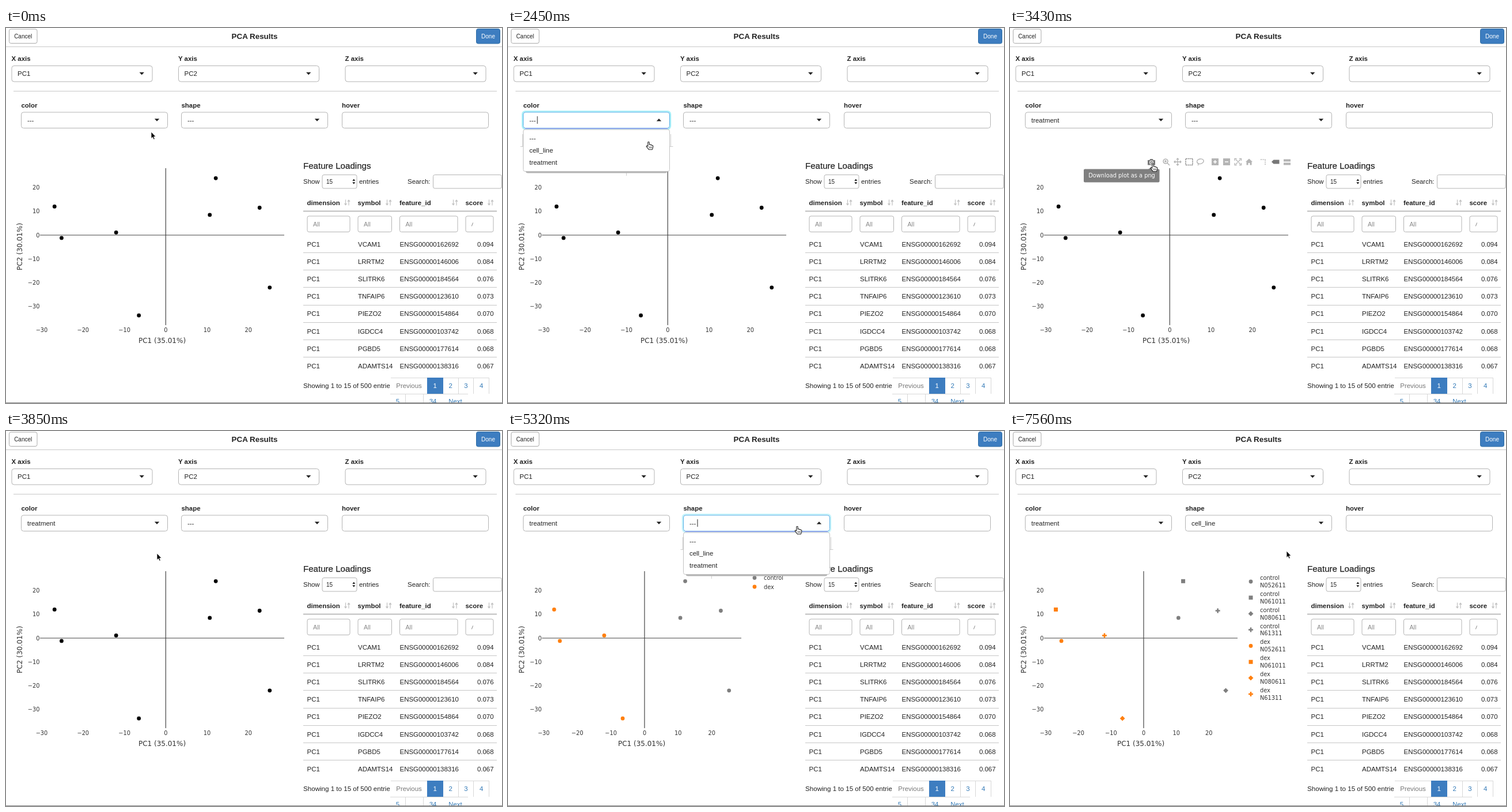
Animation, 861 px wide and 650 px high, one loop 8 s. Source, as an HTML page:

```html
<!DOCTYPE html>
<html lang="en">
<head>
<meta charset="utf-8">
<title>PCA Results</title>
<style>
html, body { margin: 0; height: 100%; overflow: hidden; background: #fff }
svg { display: block; width: 100vw; height: 100vh }
text { font: 11.45px "Liberation Sans", Arial, sans-serif; fill: #222 }
.bold { font-weight: bold }
.mid { text-anchor: middle }
.end { text-anchor: end }
.btn { font-size: 10px }
.head { font-size: 13.4px }
.section { font-size: 15.1px; stroke: #222; stroke-width: .25 }
.info { font-size: 11.6px }
.plot { font: 9.8px "DejaVu Sans", Verdana, sans-serif; fill: #333 }
.title { font-size: 12px }
.blue { fill: #337ab7 }
.gray { fill: #777 }
.white { fill: #fff }
.hint { fill: #888; font-size: 10.6px }
</style>
</head>
<body>
<svg viewBox="0 0 861 650"><g id="page"></g><g id="live"></g></svg>
<script>
const LOOP = 8000, STEP = 70;
const COLOR_OPEN = 1190, COLOR_CLOSE = 2870, COLOR_PLOT = 4130;
const SHAPE_OPEN = 5250, SHAPE_CLOSE = 6930, SHAPE_PLOT = 7490;
const COLOR_X = 26.5, SHAPE_X = 304.5;
const GRAY = '#7f7f7f', ORANGE = '#ff7f0e', BORDER = '#b4b4b4', BLUE = '#3d7dc0';
const options = ['---', 'cell_line', 'treatment'];
const lines = ['N052611', 'N061011', 'N080611', 'N61311'];

// PC1, PC2, cell line index; the first four samples are treated
const samples = [
  [-25.2, -1.2, 0], [-26.9, 12, 1], [-6.5, -33.7, 2], [-12, 1.1, 3],
  [10.65, 8.5, 0], [12.1, 23.9, 1], [25.15, -22, 2], [22.7, 11.5, 3]
];
const path = [
  [0, 252, 180], [70, 252, 180], [840, 245, 164], [2030, 245, 164], [2450, 244, 197],
  [2800, 248, 232], [3430, 248, 235], [3500, 248, 235], [3640, 262, 212], [4130, 262, 212],
  [4550, 343, 184], [4900, 502, 165], [5600, 502, 165], [6300, 480, 202], [6860, 480, 208], [LOOP, 480, 208]
];

const clamp = v => Math.max(0, Math.min(1, v));
const text = (x, y, s, cls = '') => `<text x="${x}" y="${y}" class="${cls}">${s}</text>`;
const rect = (x, y, w, h, fill = '#fff', stroke = BORDER, r = 0) =>
  `<rect x="${x}" y="${y}" width="${w}" height="${h}" rx="${r}" fill="${fill}" stroke="${stroke}"/>`;
const line = (d, color, w = 1, dash = 'none') =>
  `<path d="${d}" fill="none" stroke="${color}" stroke-width="${w}" stroke-dasharray="${dash}"/>`;
const fill = (d, color) => `<path d="${d}" fill="${color}"/>`;
const caretDown = (x, y) => fill(`M${x - 4.2} ${y - 2.3}h8.4l-4.2 4.6z`, '#222');
const caretUp = (x, y) => fill(`M${x - 4.2} ${y + 2}h8.4l-4.2 -4.6z`, '#222');

function header() {
  let s = rect(5.5, 2, 48.5, 24.5, '#fff', '#aaa', 3) + text(29.7, 18, 'Cancel', 'btn mid')
    + text(431.5, 19, 'PCA Results', 'bold head mid')
    + rect(816.5, 1.5, 41, 25.5, BLUE, '#2e6da4', 3) + text(837, 18, 'Done', 'btn mid white')
    + line('M0 32.5H861', '#c8c8c8') + line('M13 109.5H852', '#c8c8c8');
  [['X', 10, 'PC1'], ['Y', 299.5, 'PC2'], ['Z', 589, '']].forEach(([axis, x, value]) => {
    s += text(x - .5, 57, axis + ' axis', 'bold') + rect(x, 65.5, 244, 27.5, '#fff', BORDER, 4)
      + text(x + 10, 83, value) + caretDown(x + 225.7, 79);
  });
  return s + text(583, 138, 'hover', 'bold') + rect(583.5, 146, 254, 27.5, '#fff', BORDER, 4);
}

function table() {
  let s = text(516, 244, 'Feature Loadings', 'section')
    + text(516, 269.5, 'Show') + rect(549, 254.5, 60, 23.5, '#fff', BORDER, 3) + text(556, 270, '15', 'btn')
    + fill('M601.3 265l2.5-3.6 2.5 3.6zm0 2.2h5l-2.5 3.6z', '#222')
    + text(613, 269.5, 'entries') + text(697, 269.5, 'Search:') + rect(741.5, 254.5, 119, 23.5, '#fff', BORDER, 3);

  [['dimension', 523, 587, 74], ['symbol', 611, 659, 58.5], ['feature_id', 683.5, 774, 100.5], ['score', 798, 836, 48]]
    .forEach(([name, x, icon, w], i) => {
      s += text(x - .5, 306.5, name, 'bold')
        + line(`M${icon + 2.5} 297.5v9m-2-2.4l2 2.6 2-2.6M${icon + 8} 307.5v-9m-2 2.4l2-2.6 2 2.6`, '#c0c0c0', 1.2)
        + rect(x, 326, w, 27.5, '#fff', BORDER, 3)
        + (i < 3 ? text(x + 10, 344, 'All', 'hint') : line('M808.3 343.5l2.3-6', '#888'));
    });
  s += line('M516 317.5H852', '#bdbdbd', 2);

  `VCAM1 162692 94,LRRTM2 146006 84,SLITRK6 184564 76,TNFAIP6 123610 73,PIEZO2 154864 70,IGDCC4 103742 68,PGBD5 177614 68,ADAMTS14 138316 67`
    .split(',').forEach((row, i) => {
      const [gene, id, score] = row.split(' '), y = 379 + i * 30.1;
      s += text(522.5, y, 'PC1') + text(611, y, gene) + text(683.5, y, 'ENSG00000' + id)
        + text(846.5, y, '0.0' + score, 'end');
      if (i < 7) s += line(`M516 ${Math.round(y + 10.2) + .5}H852`, '#c6c6c6');
    });
  return s;
}

function pager() {
  let s = text(516, 623.5, 'Showing 1 to 15 of 500 entries', 'info') + fill('M666.5 605h194v44h-194z', '#fff')
    + line('M668 606.5H839M667 634.5H802M693.5 635v14M724.5 635v14M785.5 607v27M811.5 607v27M838.5 607v27', '#d8d8d8')
    + fill('M731 606h28v28H731z', BLUE) + text(699.5, 624, 'Previous', 'mid gray');
  ['1', '2', '3', '4'].forEach((n, i) => s += text(744.8 + i * 26.8, 624, n, 'mid ' + (i ? 'blue' : 'white')));
  return s + text(680, 651, '5', 'mid blue') + text(741, 651, '34', 'mid blue') + text(780, 651, 'Next', 'mid blue')
    + fill('M0 649h861v1H0z', '#888');
}

function marker(x, y, shape, color) {
  const d = ['M-3.4 0a3.4 3.4 0 1 0 6.8 0a3.4 3.4 0 1 0 -6.8 0', 'M-3.5 -3.5h7v7h-7z',
    'M0 -4.4L4.4 0 0 4.4 -4.4 0z', 'M-1.3 -4h2.6v2.7h2.7v2.6h-2.7v2.7h-2.6v-2.7h-2.7v-2.6h2.7z'][shape];
  return `<path transform="translate(${x} ${y})" d="${d}" fill="${color}"/>`;
}

function plot(mode) {
  const x0 = [277.3, 237, 232][mode], right = [483, 405, 395][mode];
  const px = v => x0 + v * (x0 - 62) / 30, py = v => 359 - v * 4.13;
  const label = v => (v < 0 ? '−' : '') + Math.abs(v);
  let s = line(`M59 359H${right}M${x0} 243V515`, '#444', 1.2);
  for (let v = -30; v <= 20; v += 10)
    s += text(px(v), 526.5, label(v), 'plot mid') + text(58.5, py(v) + 3.5, label(v), 'plot end');
  s += text((59 + right) / 2, 546, 'PC1 (35.01%)', 'plot title mid')
    + `<g transform="translate(27.8 379) rotate(-90)">${text(0, 0, 'PC2 (30.01%)', 'plot title mid')}</g>`;
  samples.forEach(([x, y, cell], i) =>
    s += marker(px(x), py(y), mode == 2 ? cell : 0, mode ? (i < 4 ? ORANGE : GRAY) : '#000'));
  ['control', 'dex'].forEach((name, g) => {
    const color = g ? ORANGE : GRAY;
    if (mode == 1) s += marker(428, 254.5 + g * 15.5, 0, color) + text(444, 258 + g * 15.5, name, 'plot');
    if (mode == 2) lines.forEach((cell, i) => {
      const y = 261 + (g * 4 + i) * 27.85;
      s += marker(418, y, i, color) + text(434, y - 3, name, 'plot') + text(434, y + 9.8, cell, 'plot');
    });
  });
  return s;
}

function select(x, name, value, open) {
  let s = text(x, 138, name, 'bold');
  if (open) s += `<rect x="${x - 1.5}" y="144.5" width="257" height="30.5" rx="5" fill="none" stroke="#70e4f4" stroke-width="2.5" opacity="${.6 * open}"/>`;
  s += rect(x, 146, 254, 27.5, '#fff', open ? '#5aaee6' : BORDER, 4);
  if (open) s += line(`M${x + 3} 174.3h248`, '#a9a2ee', 1.2);
  return s + text(x + 10.5, 164, value) + (open ? caretUp : caretDown)(x + 235.5, 159.5);
}

function menu(x, age, tickX) {
  let s = line(`M${x - 5} 205.5h265M${x - 1} 184v22M${x + 256} 184v22M${tickX} 250v6`, '#ccc')
    + rect(x + 4, 240, 246, 11.5, '#b4b4b4', 'none', 4) + rect(x, 176, 254, 72.5, '#fff', '#c4c4c4', 3);
  options.forEach((o, i) => s += text(x + 10.5, 194.5 + i * 21.2, o));
  const blink = age - 130;
  if (age >= 70 && (blink < 0 || blink % 1000 < 500)) s += line(`M${x + 24.5} 153v13`, '#222');
  return s;
}

function modebar(alpha) {
  const pale = '#b4b4b4', dark = '#777';
  return `<g opacity="${alpha}">`
    + fill('M239 229h3l1.5-2h4l1.5 2h3v8.5h-13z', dark) + marker(245.5, 233, 0, '#fff')
    + line('M245.5 231.3a1.7 1.7 0 1 0 .1 0', dark, 1.4)
    + line('M270 227a4 4 0 1 0 .1 0M273 234l4 4M268 231h4M270 229v4', pale, 1.6)
    + line('M285 232h12M291 226v12M287 230l-2 2 2 2M295 230l2 2-2 2M289 228l2-2 2 2M289 236l2 2 2-2', pale, 1.3)
    + line('M305 226.5h12v11h-12z', dark, 1.5, '2 1.3')
    + line('M327 235c-4-2-3-7 3-8s8 4 4 7-6 1-7 1 1 2-1 3', pale, 1.4)
    + fill('M350 226h12v12h-12zM370 226h12v12h-12z', pale) + line('M353 232h6M356 229v6M373 232h6', '#fff', 1.6)
    + line('M390 230v-3.5h3.5M398 226.5h3.5v3.5M401.5 234v3.5h-3.5M393.5 237.5h-3.5v-3.5M392 228l8 8M400 228l-8 8', pale, 1.3)
    + fill('M409 232l6-5.5 6 5.5h-1.5v5.5h-3v-3.5h-3v3.5h-3v-5.5z', pale)
    + line('M435 228h8M443 228v10', pale, 1.5, '2 1.5')
    + fill('M454 232l3.5-3.5h10v7h-10z', dark) + fill('M475 227.5h12v4h-12zM475 233.5h12v4h-12z', pale)
    + fill('M240 245l5-4 5 4z', GRAY) + rect(128, 244.5, 131.5, 23, GRAY, 'none', 2)
    + text(194, 259.3, 'Download plot as a png', 'plot mid white') + '</g>';
}

function cursor(t) {
  const i = path.findIndex(p => p[0] > t), [ta, xa, ya] = path[i - 1], [tb, xb, yb] = path[i];
  const k = (t - ta) / (tb - ta), x = xa + (xb - xa) * k, y = ya + (yb - ya) * k;
  const hand = t >= 630 && t < 3570 || t >= 4830 && t < SHAPE_CLOSE;
  const shape = hand
    ? '<path d="M-1.2 8V1.4a1.2 1.2 0 0 1 2.4 0V5q1.9-.8 2.3.7 1.9-.6 2.3.8 2-.3 2 1.6 0 3-1.5 5.6H.3Q-1.4 11-3.7 8.6-4 6.8-2.5 7.2z" fill="#fff" stroke="#222" stroke-width="1.1"/>'
      + line('M1.4 8.5v3M3.4 8.5v3M5.3 8.5v3', '#222', .8)
    : '<path d="M0 0V11.5L2.6 9.2 4.4 13.2 6.3 12.4 4.6 8.5H8z" stroke="#fff" stroke-width=".8"/>';
  return `<g transform="translate(${x} ${y})">${shape}</g>`;
}

function live(t) {
  const glow = (from, to) => t >= from && t < to ? clamp((t - from + STEP) / 210) : 0;
  const colorOpen = glow(COLOR_OPEN, COLOR_CLOSE), shapeOpen = glow(SHAPE_OPEN, SHAPE_CLOSE);
  const bar = clamp((t - 2940) / 210) * (1 - clamp((t - 3640) / 210));
  return plot(t < COLOR_PLOT ? 0 : t < SHAPE_PLOT ? 1 : 2)
    + (bar ? modebar(bar) : '')
    + select(COLOR_X, 'color', options[t < COLOR_CLOSE ? 0 : 2], colorOpen)
    + select(SHAPE_X, 'shape', options[t < SHAPE_CLOSE ? 0 : 1], shapeOpen)
    + (colorOpen ? menu(COLOR_X, t - COLOR_OPEN, 205.5) : '')
    + (shapeOpen ? menu(SHAPE_X, t - SHAPE_OPEN, 353.5) : '')
    + cursor(t);
}

const stage = document.getElementById('live');
document.getElementById('page').innerHTML = header() + table() + pager();
let start, shown;
function draw(now) {
  start ??= now;
  const t = Math.floor((now - start) % LOOP / STEP) * STEP;
  if (t !== shown) stage.innerHTML = live(shown = t);
  requestAnimationFrame(draw);
}
draw(performance.now());
</script>
</body>
</html>
```
